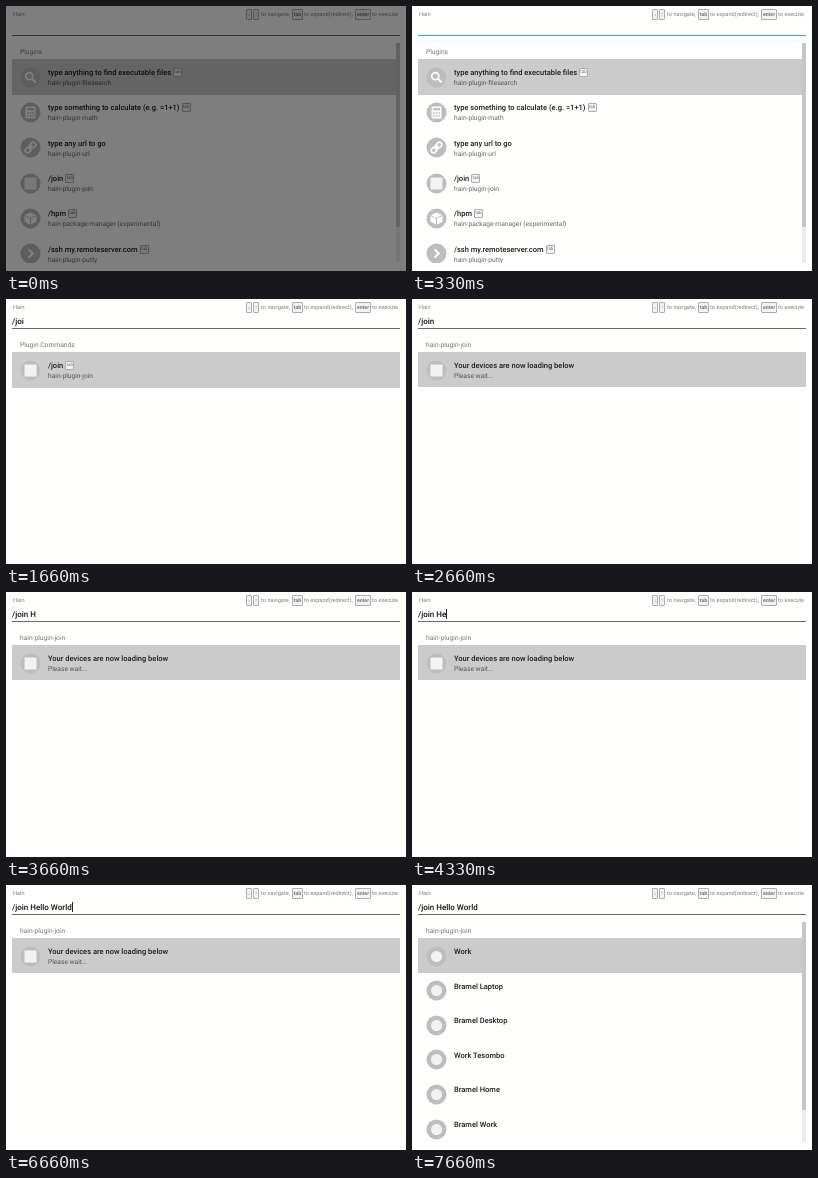
These frames come from a looping animation (400 by 265 pixels, 8 s). An HTML page:

```html
<!DOCTYPE html>
<html lang="en">
<head>
<meta charset="utf-8">
<title>Launcher</title>
<style>
html, body { margin: 0; width: 100%; height: 100%; overflow: hidden; }
body { position: relative; background: #fefefd; font-family: Roboto, sans-serif; text-rendering: geometricPrecision; }
body * { position: absolute; box-sizing: border-box; white-space: pre; line-height: 10px; }
.head { top: 4px; font-size: 5.65px; color: #808080; }
kbd { font-family: inherit; text-align: center; border: 1px solid #adadad; border-radius: 1px; background: #f3f3f3; }
.key { top: 3px; height: 11px; line-height: 10px; font-size: 5.2px; font-weight: 700; color: #777; }
#input { left: 6px; top: 18px; font-size: 8px; font-weight: 500; color: #111; }
#caret { left: 100%; top: -1px; width: 1px; height: 10px; background: #222; }
#line { left: 6px; top: 29px; width: 388px; height: 1px; background: #6a6a6a; }
#line.empty { background: #1fb6cf; }
#label { left: 14px; top: 40.6px; font-size: 6.7px; color: #777; }
#list { left: 6px; top: 37px; width: 388px; height: 220px; overflow: hidden; }
.row { left: 0; width: 388px; }
.row.on { background: #cbcbcb; }
.row svg { left: 7.5px; top: 7.8px; }
.title { left: 36px; top: 9.2px; font-size: 7.53px; font-weight: 500; color: #1c1c1c; }
.title kbd { left: calc(100% + 2px); top: 0; width: 9px; height: 9px; line-height: 7px; font-size: 4.5px; font-weight: 400; color: #777; }
.sub { left: 36px; top: 19.1px; font-size: 6.66px; color: #686868; }
.on .sub { color: #555; }
.bar { left: 384px; top: 0; width: 4px; height: 220px; background: #ececec; }
.bar i { width: 4px; background: #c6c6c8; }
#dim { inset: 0; background: rgba(0, 0, 0, .5); }
</style>
</head>
<body>
<span class="head" style="left:7px">Hain</span>
<kbd class="key" style="left:240px;width:6px">↓</kbd>
<kbd class="key" style="left:247px;width:6px">↑</kbd>
<span class="head" style="left:255px">to navigate,</span>
<kbd class="key" style="left:286px;width:11px">tab</kbd>
<span class="head" style="left:298px">to expand(redirect),</span>
<kbd class="key" style="left:349px;width:16px">enter</kbd>
<span class="head" style="left:366px">to execute</span>
<span id="input"><span id="text" style="position:static"></span><i id="caret"></i></span>
<div id="line"></div>
<div id="list"></div>
<span id="label"></span>
<div id="dim"></div>
<script>
const $ = id => document.getElementById(id);

const icons = {
  search: '<g fill="none" stroke="#fff" stroke-width="1.7"><circle cx="-1.2" cy="-1.3" r="3.5"/><path d="M1.4 1.3L5.2 5.1" stroke-width="2.1"/></g>',
  calc: '<rect x="-5" y="-6" width="10" height="12" rx="1" fill="#fff"/><path d="M-3.5-3.3H3.5" stroke="#bdbdbd" stroke-width="2.2"/><path d="M-3.5 .5H4M-3.5 3.5H4" stroke="#bdbdbd" stroke-width="1.7" stroke-dasharray="1.7 1"/>',
  link: '<g transform="rotate(-45)" fill="none" stroke="#fff" stroke-width="1.6"><rect x="-6.5" y="-2.4" width="6.2" height="4.8" rx="2.4"/><rect x=".3" y="-2.4" width="6.2" height="4.8" rx="2.4"/><path d="M-2.6 0H2.6"/></g>',
  cube: '<path d="M0-6L6-3.2V3.3L0 6.3L-6 3.3V-3.2Z" fill="#fff"/><path d="M-6-3L0-.2L6-3M0-.2V6.3" fill="none" stroke="#bdbdbd"/>',
  chevron: '<path d="M-2-4.2L2.2 0L-2 4.2" fill="none" stroke="#fff" stroke-width="2"/>',
  square: '<rect x="-6" y="-6" width="12" height="12" fill="#f2f2f2"/>',
  disc: '<circle r="5.6" fill="#f2f2f2"/>'
};

// Rows: icon, title, subtitle, tab key
const join = ['square', '/join', 'hain-plugin-join', 1];
const hpm = ['cube', '/hpm', 'hain-package-manager (experimental)', 1];
const ssh = ['chevron', '/ssh my.remoteserver.com', 'hain-plugin-putty', 1];
const devices = ['Work', 'Bramel Laptop', 'Bramel Desktop', 'Work Tesombo', 'Bramel Home', 'Bramel Work'];

const views = {
  home: { label: 'Plugins', pitch: 35.3, thumb: 184, rows: [
    ['search', 'type anything to find executable files', 'hain-plugin-filesearch', 1],
    ['calc', 'type something to calculate (e.g. =1+1)', 'hain-plugin-math', 1],
    ['link', 'type any url to go', 'hain-plugin-url'],
    join, hpm, ssh] },
  commands: { label: 'Plugin Commands', pitch: 35.3, rows: [
    join, hpm, ssh,
    ['chevron', '/reload', 'hain-commands'],
    ['chevron', '/about', 'hain-commands']] },
  match: { label: 'Plugin Commands', pitch: 35.3, rows: [join] },
  loading: { label: 'hain-plugin-join', pitch: 34.55, rows: [
    ['square', 'Your devices are now loading below', 'Please wait...']] },
  devices: { label: 'hain-plugin-join', pitch: 34.55, thumb: 188,
    rows: devices.map(name => ['disc', name, '']) }
};

// Start time, typed text, caret, view
const steps = [
  [0, '', 0, 'home'],
  [660, '/', 0, 'commands'],
  [1000, '/j', 0, 'match'],
  [1330, '/jo', 0, 'match'],
  [1660, '/joi', 0, 'match'],
  [2000, '/join ', 1, 'loading'],
  [2660, '/join ', 0, 'loading'],
  [3000, '/join ', 1, 'loading'],
  [3330, '/join ', 0, 'loading'],
  [3660, '/join H', 0, 'loading'],
  [4000, '/join H', 1, 'devices'],
  [4330, '/join He', 1, 'loading'],
  [4660, '/join Hel', 1, 'loading'],
  [5000, '/join Hell', 1, 'loading'],
  [5330, '/join Hello', 1, 'loading'],
  [5660, '/join Hello ', 1, 'loading'],
  [6000, '/join Hello W', 1, 'devices'],
  [6330, '/join Hello Wo', 1, 'loading'],
  [6660, '/join Hello World', 1, 'loading'],
  [7330, '/join Hello World', 1, 'devices'],
  [7660, '/join Hello World', 0, 'devices']
];

function rowHtml([icon, title, sub, tab], i, pitch) {
  return `<div class="row${i ? '' : ' on'}" style="top:${16 + i * pitch}px;height:${Math.ceil(pitch)}px">
<svg width="21" height="21" viewBox="-10.5 -10.5 21 21"><circle r="10" fill="#bdbdbd"/>${icons[icon]}</svg>
<span class="title">${title}${tab ? '<kbd>tab</kbd>' : ''}</span><span class="sub">${sub}</span></div>`;
}

function show(name) {
  const { label, pitch, thumb, rows } = views[name];
  $('label').textContent = label;
  $('list').innerHTML = rows.map((row, i) => rowHtml(row, i, pitch)).join('') +
    (thumb ? `<div class="bar"><i style="height:${thumb}px"></i></div>` : '');
}

let current, shown;
function tick() {
  const t = performance.now() % 8000;
  const dimmed = t < 330;
  const step = steps.findLast(s => s[0] <= t);
  const [, text, caret, view] = step;
  $('dim').hidden = !dimmed;
  $('line').className = text || dimmed ? '' : 'empty';
  if (step !== current) {
    current = step;
    $('text').textContent = text;
    $('caret').hidden = !caret;
    if (view !== shown) show(shown = view);
  }
  requestAnimationFrame(tick);
}
tick();
</script>
</body>
</html>
```
